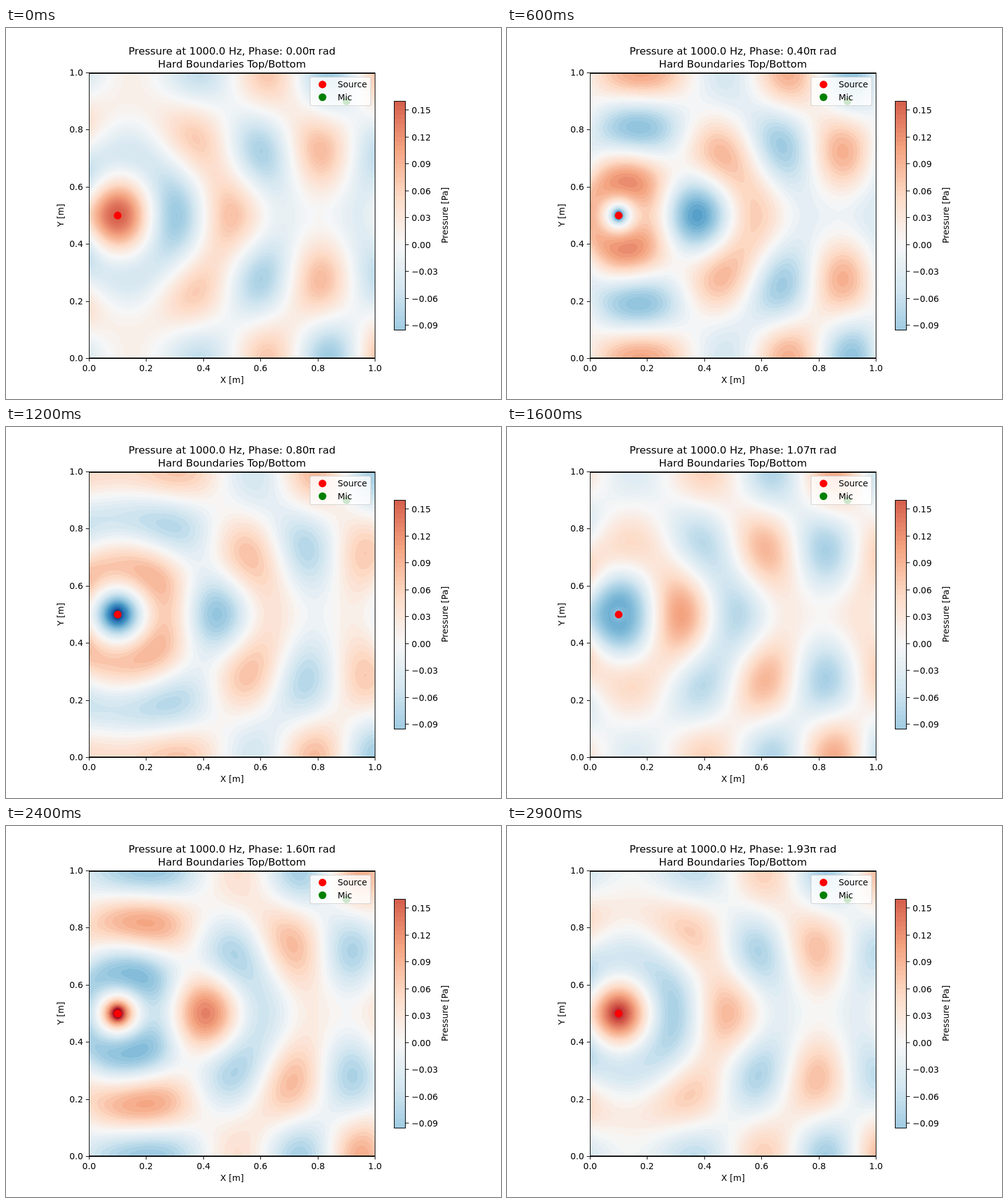
Recreate the animation shown at these times as an HTML page with a canvas. Size 800 by 600 pixels, loop 3 s.

```html
<!DOCTYPE html>
<html>
<head>
<meta charset="utf-8">
<style>
html, body { margin: 0; width: 100%; height: 100%; overflow: hidden; background: #fff; }
canvas { display: block; }
</style>
</head>
<body>
<canvas id="stage" width="800" height="600"></canvas>
<script>
const ctx = document.getElementById('stage').getContext('2d');
const LEFT = 134, TOP = 72, SIZE = 462, STEPS = 30, STEP_MS = 100;

// Diverging red-blue colour scale, symmetric about zero
const STOPS = [0x053061, 0x2166ac, 0x4393c3, 0x92c5de, 0xd1e5f0, 0xf7f7f7,
  0xfddbc7, 0xf4a582, 0xd6604d, 0xb2182b, 0x67001f];
const SCALE = 0.264;
function colour(value) {
  const pos = Math.min(9.999, Math.max(0, 5 + 5 * value / SCALE));
  const i = Math.floor(pos), f = pos - i;
  return [16, 8, 0].map(s => {
    const a = STOPS[i] >> s & 255, b = STOPS[i + 1] >> s & 255;
    return Math.round(a + (b - a) * f);
  });
}

// Complex numbers as [re, im]
const add = (...zs) => zs.reduce((a, b) => [a[0] + b[0], a[1] + b[1]]);
const mul = (a, b) => [a[0] * b[0] - a[1] * b[1], a[0] * b[1] + a[1] * b[0]];
const div = (a, b) => {
  const m = b[0] * b[0] + b[1] * b[1];
  return mul(a, [b[0] / m, -b[1] / m]);
};

// Duct modes: rigid top and bottom, impedance-matched left and right ends
const K = 2 * Math.PI * 1000 / 343, AMP = 0.19, SRC = 0.1;
const re = new Float32Array(SIZE * SIZE), im = new Float32Array(SIZE * SIZE);
for (let n = 0; n <= 120; n += 2) {
  const ky = n * Math.PI, q2 = K * K - ky * ky, q = Math.sqrt(Math.abs(q2));
  const qz = q2 > 0 ? [q, 0] : [0, q];
  const wave = d => q2 > 0 ? [Math.cos(q * d), Math.sin(q * d)] : [Math.exp(-q * d), 0];
  const refl = div(add(qz, [-K, 0]), add(qz, [K, 0])), refl2 = mul(refl, refl);
  const gain = AMP * (n ? 4 : 2) * Math.cos(ky / 2) * Math.exp(-((n / 70) ** 2));
  const echo = mul(refl2, wave(2));
  const coef = div([gain, 0], mul(qz, [1 - echo[0], -echo[1]]));
  const across = Array.from({ length: SIZE }, (_, i) => {
    const x = (i + 0.5) / SIZE, d = Math.abs(x - SRC);
    return mul(coef, add(wave(d), mul(refl, add(wave(x + SRC), wave(2 - x - SRC))),
      mul(refl2, wave(2 - d))));
  });
  for (let j = 0, p = 0; j < SIZE; j++) {
    const c = Math.cos(ky * (j + 0.5) / SIZE);
    for (let i = 0; i < SIZE; i++, p++) {
      re[p] += across[i][0] * c;
      im[p] += across[i][1] * c;
    }
  }
}

const image = ctx.createImageData(SIZE, SIZE);
image.data.fill(255);
const field = new Float32Array(SIZE * SIZE);

function drawField(phase) {
  const c = Math.cos(phase), s = Math.sin(phase);
  let lo = 0, hi = 0;
  for (let p = 0; p < field.length; p++) {
    const v = field[p] = re[p] * c + im[p] * s;
    if (v < lo) lo = v;
    if (v > hi) hi = v;
  }
  // Contour spacing: the smallest round step giving about fifty bands
  const raw = (hi - lo) / 51 * 1000;
  const band = ([1, 2, 3, 4, 5, 6, 8].find(b => b >= raw) || 10) / 1000;
  const first = Math.floor(lo / band), shades = [];
  for (let b = first; b * band <= hi; b++) shades.push(colour((b + 0.5) * band));
  for (let p = 0; p < field.length; p++) {
    const rgb = shades[Math.floor(field[p] / band) - first] || shades[0];
    image.data[4 * p] = rgb[0];
    image.data[4 * p + 1] = rgb[1];
    image.data[4 * p + 2] = rgb[2];
  }
  ctx.putImageData(image, LEFT, TOP);
}

function text(str, x, y, align = 'center', size = 13.89, turn = 0) {
  ctx.save();
  ctx.translate(x, y);
  ctx.rotate(turn);
  ctx.font = size + 'px "DejaVu Sans", sans-serif';
  ctx.textAlign = align;
  ctx.fillStyle = '#000';
  ctx.fillText(str, 0, 0);
  ctx.restore();
}

function rect(x, y, w, h, fill = '#000') {
  ctx.fillStyle = fill;
  ctx.fillRect(x, y, w, h);
}

function dot(x, y, fill) {
  ctx.fillStyle = fill;
  ctx.beginPath();
  ctx.arc(x, y, 6.2, 0, 7);
  ctx.fill();
}

function drawAxes() {
  rect(LEFT, TOP, 1, SIZE + 1);
  rect(LEFT + SIZE, TOP, 1, SIZE + 1);
  rect(LEFT, TOP, SIZE + 1, 2);
  rect(LEFT, TOP + SIZE - 1, SIZE + 1, 2);
  for (let i = 0; i <= 5; i++) {
    const d = Math.round(i * SIZE / 5), label = (i / 5).toFixed(1);
    rect(LEFT + d, TOP + SIZE, 1, 5.4);
    rect(LEFT - 5, TOP + SIZE - d, 5, 1);
    text(label, LEFT + d + 0.4, 555);
    text(label, 124.6, TOP + SIZE - d + 5.4, 'right');
  }
  text('X [m]', 365.3, 574);
  text('Y [m]', 93.3, 303, 'center', 13.89, -Math.PI / 2);
}

function drawLegend() {
  ctx.beginPath();
  ctx.roundRect(491.5, 79.5, 98, 46, 2.8);
  ctx.fillStyle = 'rgba(255,255,255,0.8)';
  ctx.strokeStyle = 'rgba(204,204,204,0.8)';
  ctx.lineWidth = 1.2;
  ctx.fill();
  ctx.stroke();
  dot(511.5, 91.4, '#f00');
  dot(511.5, 112, '#008000');
  text('Source', 536, 96, 'left');
  text('Mic', 536, 117, 'left');
}

function drawColourBar() {
  const yOf = v => 118.4 + (0.16 - v) * 1450;
  for (let i = 0; i < 51; i++) {
    const v = -0.095 + i * 0.005, y = Math.round(yOf(v + 0.005));
    rect(627, y, 18, Math.round(yOf(v)) - y, `rgb(${colour(v + 0.0025)})`);
  }
  ctx.strokeStyle = '#000';
  ctx.lineWidth = 1.1;
  ctx.strokeRect(627.5, 118.5, 18, 370);
  for (let i = -3; i <= 5; i++) {
    const y = yOf(i * 0.03);
    rect(646, Math.floor(y), 5, 1);
    text((i < 0 ? '\u2212' : '') + Math.abs(i * 0.03).toFixed(2), 655.6, y + 5.2, 'left');
  }
  text('Pressure [Pa]', 713.8, 303, 'center', 13.89, -Math.PI / 2);
}

function draw(step) {
  const turns = step * 2 / STEPS;
  rect(0, 0, 800, 600, '#fff');
  drawField(turns * Math.PI);
  text(`Pressure at 1000.0 Hz, Phase: ${turns.toFixed(2)}π rad`, 365.2, 43, 'center', 16.67);
  text('Hard Boundaries Top/Bottom', 365.2, 64, 'center', 16.67);
  dot(180.5, 303.3, '#f00');
  dot(550.3, 118.5, '#008000');
  drawAxes();
  drawLegend();
  drawColourBar();
}

let shown = -1;
const start = performance.now();
function tick() {
  const step = Math.floor((performance.now() - start) / STEP_MS) % STEPS;
  if (step !== shown) draw(shown = step);
  requestAnimationFrame(tick);
}
tick();
</script>
</body>
</html>
```
